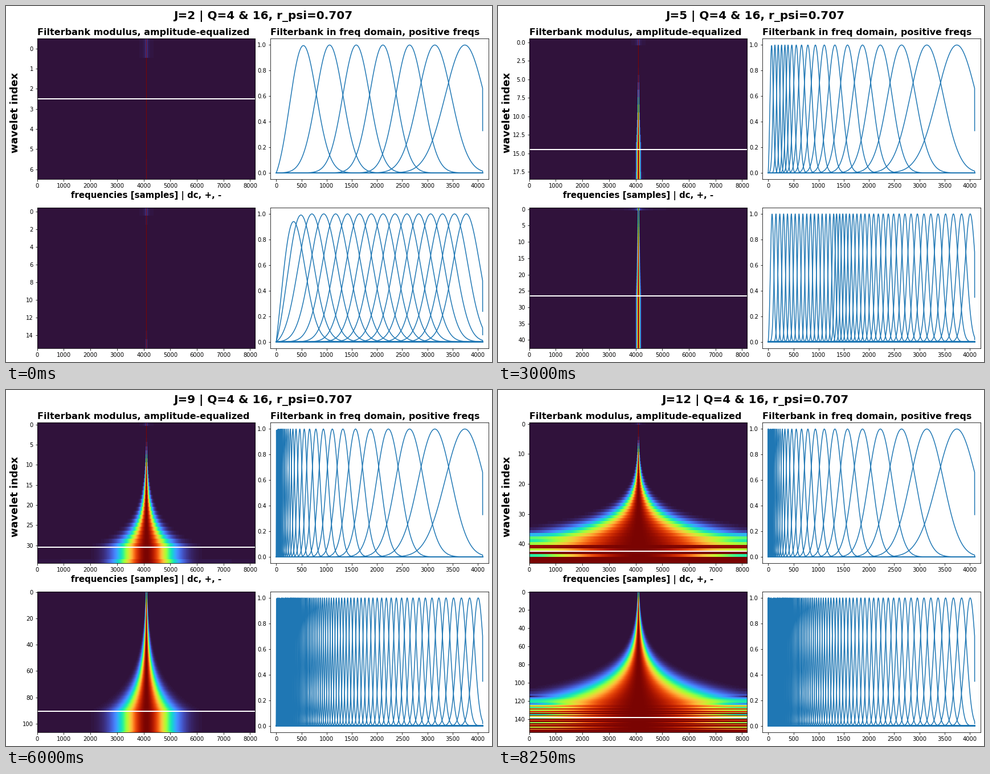
These frames come from a looping animation (853 px wide and 625 px high, 9750 ms). A matplotlib script:

```python
import math

import matplotlib.pyplot as plt
import numpy as np
from matplotlib.animation import FuncAnimation

W, H, DPI = 853, 625, 72
N = 8192
SIGMA0 = 0.13
R_PSI = math.sqrt(0.5)
QS = (4, 16)
SCALES = [2, 2, *range(3, 12), 12, 12]

# Panel geometry in pixels, measured from the bottom left corner
LEFT, BOTTOM = 54.75, 24.15
AX_W, AX_H = 792 / 2.07, 543.6 / 2.2
STEP_X, STEP_Y = AX_W * 1.07, AX_H * 1.2


def filter_params(J, Q):
    """Centre frequencies and widths, highest first, and the geometric count."""
    ratio = 2 ** (-1 / Q)
    sigma_min = SIGMA0 / 2 ** J
    xi = elbow = 1 / (1 + 2 ** (1 / Q))
    sigma = xi * (1 - ratio) / (1 + ratio) / math.sqrt(2 * math.log(1 / R_PSI))
    params = []
    while sigma > sigma_min:
        params.append((xi, sigma))
        elbow = xi
        xi, sigma = xi * ratio, sigma * ratio
    n_geometric = len(params)
    params += [(elbow * (1 - q / (Q + 1)), sigma_min) for q in range(1, Q + 1)]
    return params, n_geometric


def gauss(freqs, centre, sigma):
    dist = (freqs - centre + 0.5) % 1 - 0.5
    return np.exp(-dist ** 2 / (2 * sigma ** 2))


def filterbank(J, Q):
    """Analytic Morlet filters in frequency, one per row."""
    params, n_geometric = filter_params(J, Q)
    freqs = np.arange(N) / N
    rows = []
    for xi, sigma in params:
        gabor = gauss(freqs, xi, sigma)
        psi = gabor - gabor[0] * gauss(freqs, 0, sigma)
        psi /= np.abs(np.fft.ifft(psi)).sum()
        psi[N // 2] /= 2
        psi[N // 2 + 1:] = 0
        rows.append(psi)
    return np.array(rows), n_geometric


def draw_modulus(ax, bank, n_geometric):
    modulus = np.abs(np.fft.fftshift(np.fft.ifft(bank, axis=1), axes=1))
    modulus /= modulus.max(axis=1, keepdims=True)
    ax.imshow(modulus, cmap="turbo", vmin=0, vmax=1, aspect="auto",
              interpolation="none")
    if n_geometric:
        ax.axhline(n_geometric - 0.5, color="w", linewidth=2)


def draw_spectra(ax, bank):
    ax.plot(bank[:, :N // 2 + 1].T, color="tab:blue", linewidth=1.5)
    half = N // 2
    pad = 0.028 * half
    ax.set_xlim(-pad, half + pad)
    ax.set_ylim(-0.05, 1.05)


def panel(row, col):
    x, y = LEFT + col * STEP_X, BOTTOM + (1 - row) * STEP_Y
    return fig.add_axes([x / W, y / H, AX_W / W, AX_H / H])


# The tiny excess keeps the pixel size from being truncated
fig = plt.figure(figsize=((W + 1e-6) / DPI, (H + 1e-6) / DPI), dpi=DPI,
                 facecolor="white")
axes = [[panel(row, col) for col in range(2)] for row in range(2)]
heading = fig.text((LEFT + 396) / W, 602 / H, "", fontsize=20, weight="bold",
                   ha="center", va="baseline")
fig.text(21 / W, 437.5 / H, "wavelet index", fontsize=18, weight="bold",
         rotation=90, rotation_mode="anchor", ha="center", va="baseline")


def draw(i):
    J = SCALES[i]
    heading.set_text(f"J={J} | Q={QS[0]} & {QS[1]}, r_psi={R_PSI:.3f}")
    for (left, right), Q in zip(axes, QS):
        left.clear()
        right.clear()
        bank, n_geometric = filterbank(J, Q)
        draw_modulus(left, bank, n_geometric)
        draw_spectra(right, bank)
    left, right = axes[0]
    title = dict(loc="left", fontsize=16, weight="bold")
    left.set_title("Filterbank modulus, amplitude-equalized", **title)
    right.set_title("Filterbank in freq domain, positive freqs", **title)
    left.set_xlabel("frequencies [samples] | dc, +, -", fontsize=15,
                    weight="bold")
    return []


anim = FuncAnimation(fig, draw, frames=len(SCALES), interval=750,
                     init_func=lambda: [], repeat=True, repeat_delay=0)
plt.show()
```
